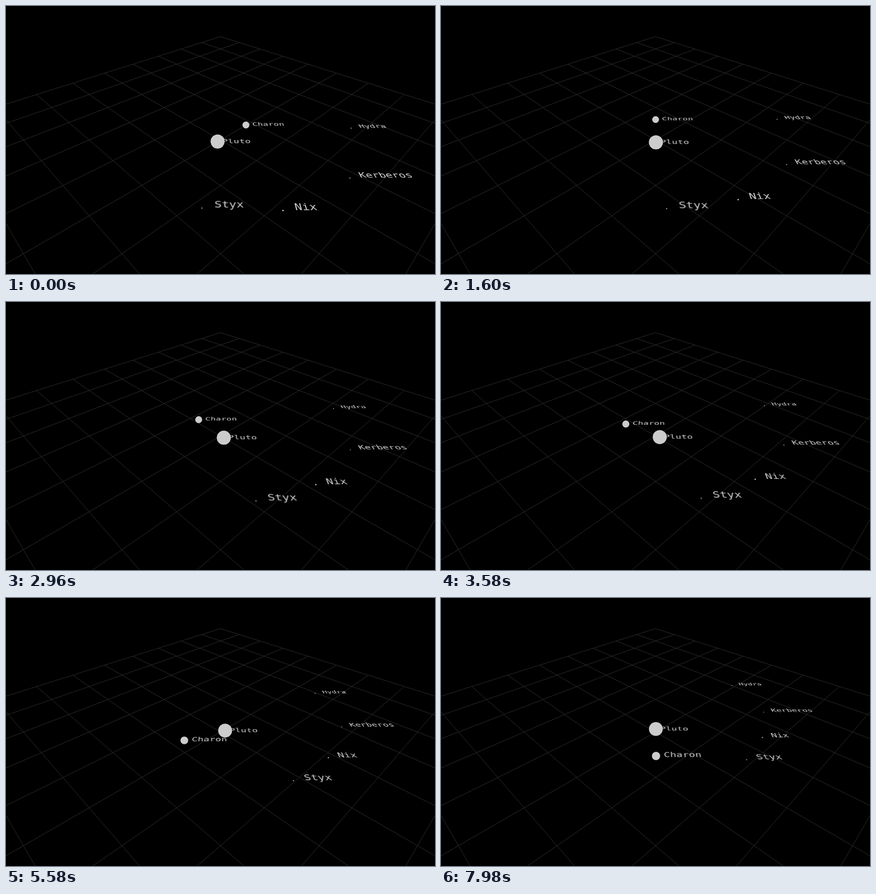
Animation, 800 px wide and 500 px high, one loop 8 s. Source, as an HTML page:

```html
<!DOCTYPE html>
<html lang="en">
<head>
<meta charset="utf-8">
<title>Moons of Pluto</title>
<style>
  html, body { margin: 0; width: 100%; height: 100%; overflow: hidden; background: #000; }
  #stage { position: relative; width: 800px; height: 500px; overflow: hidden; background: #000; }
  svg { position: absolute; left: 0; top: 0; display: block; }
  .grid { fill: none; stroke: #2a2a2a; stroke-width: 1; }
  .bodies { fill: #ccc; }
  .label {
    position: absolute; left: 400px; top: 250px; transform-origin: 0 0;
    font: 17.7px/1 "DejaVu Sans Mono", monospace; color: #ccc; white-space: pre;
  }
</style>
</head>
<body>
<div id="stage">
  <svg width="800" height="500" viewBox="0 0 800 500">
    <path class="grid" id="grid"/>
    <g class="bodies" id="bodies"></g>
  </svg>
</div>
<script>
const LOOP = 8000;
const DAY = 2000;                       // ms per simulated day
const FOCAL = 600;
const CELL = FOCAL / (4 * Math.sqrt(3));
const TILT = Math.acos(1 / Math.sqrt(3));
const SIN = Math.sin(TILT), COS = Math.cos(TILT);
const RAD = Math.PI / 180;

// Lengths in grid cells, periods in days, start angles in degrees.
// shift: disc offset in px; dx, dy: label offset on the ground.
const bodies = [
  { name: 'Pluto',    orbit: 0.0995, period: 6.387, start: 315.3, size: 0.150, shift: 0.7, dx: 0.102, dy: 0.057 },
  { name: 'Charon',   orbit: 0.8205, period: 6.387, start: 135.3, size: 0.080, shift: 0.7, dx: 0.158, dy: 0.030 },
  { name: 'Styx',     orbit: 1.978,  period: 20.16, start: -8.95, size: 0.009, shift: 0,   dx: 0.205, dy: 0 },
  { name: 'Nix',      orbit: 2.257,  period: 24.85, start: 27.08, size: 0.012, shift: 0,   dx: 0.205, dy: 0 },
  { name: 'Kerberos', orbit: 2.679,  period: 32.17, start: 63,    size: 0.009, shift: 0,   dx: 0.198, dy: 0 },
  { name: 'Hydra',    orbit: 3.003,  period: 38.2,  start: 98.9,  size: 0.011, shift: 0,   dx: 0.205, dy: 0 }
];

// Ground point (u to the right, v towards the viewer) to the screen.
function project(u, v) {
  const k = FOCAL / (FOCAL - v * CELL * SIN) * CELL;
  return { x: 400 + u * k, y: 250 + v * COS * k, k };
}

function drawGrid() {
  const at = (i, j) => {
    const p = project((i - j) * Math.SQRT1_2, (i + j) * Math.SQRT1_2);
    return p.x.toFixed(2) + ' ' + p.y.toFixed(2);
  };
  // Stop short of the camera, where the near corner would pass behind it.
  let d = '';
  for (let i = -5; i <= 5; i++) {
    const end = Math.min(5, 7 - i);
    d += `M${at(i, -5)}L${at(i, end)}M${at(-5, i)}L${at(end, i)}`;
  }
  document.getElementById('grid').setAttribute('d', d);
}

function build(body) {
  body.disc = document.createElementNS('http://www.w3.org/2000/svg', 'circle');
  document.getElementById('bodies').append(body.disc);
  body.label = document.createElement('div');
  body.label.className = 'label';
  body.label.textContent = body.name;
  document.getElementById('stage').append(body.label);
}

function place(body, t) {
  const a = (body.start + 360 * t / (body.period * DAY)) * RAD;
  const u = body.orbit * Math.sin(a), v = body.orbit * Math.cos(a);
  const p = project(u, v);
  body.disc.setAttribute('cx', p.x + body.shift);
  body.disc.setAttribute('cy', p.y - body.shift);
  body.disc.setAttribute('r', body.size * p.k);
  const x = (u + body.dx) * CELL, y = (v + body.dy) * CELL;
  body.label.style.transform =
    `perspective(${FOCAL}px) rotateX(${TILT}rad) translate(${x}px, ${y}px) translateY(-0.846em)`;
}

function render(t) {
  for (const body of bodies) place(body, t);
}

drawGrid();
bodies.forEach(build);
const begin = performance.now();
function tick() {
  render((performance.now() - begin) % LOOP);
  requestAnimationFrame(tick);
}
render(0);
requestAnimationFrame(tick);
</script>
</body>
</html>
```
